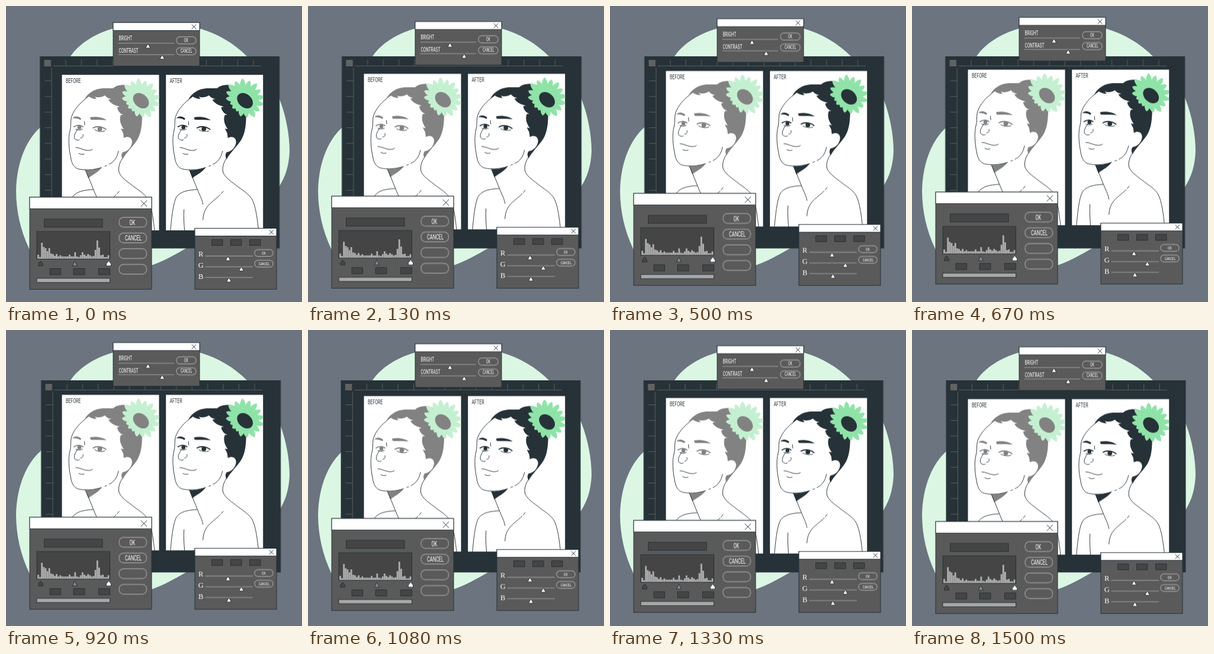
Write an HTML page that moves like this. It is 500 px wide and 500 px high and loops after 1.54 s.

```html
<!DOCTYPE html>
<html lang="en">
<head>
<meta charset="utf-8">
<title>Photo editing</title>
<style>
  html, body { margin: 0; width: 100%; height: 100%; overflow: hidden; background: #6b747f; }
  svg { display: block; width: 100vw; height: 100vh; }
  .float { animation: float 1540ms linear -50ms infinite; }
  .shake { animation: shake 1540ms linear -48ms infinite; }
  @keyframes float {
    0%, 100% { transform: translateY(.65px); }
    50% { transform: translateY(-9.35px); }
  }
  @keyframes shake {
    0%, 100% { transform: translateX(0); }
    10%, 90% { transform: translateX(-1px); }
    20%, 80% { transform: translateX(2px); }
    30%, 50%, 70% { transform: translateX(-4px); }
    40%, 60% { transform: translateX(4px); }
  }
  .body { fill: #5a5a5a; stroke: #263238; }
  .bar { fill: #fff; stroke: #263238; }
  .well { fill: #454545; stroke: #263238; }
  .strip { fill: #a9a9a9; stroke: #263238; }
  .cross { fill: none; stroke: #263238; }
  .btn { fill: none; stroke: #8a8a8a; stroke-width: 1.8; }
  .track { fill: none; stroke: #8a8a8a; stroke-width: 1.6; }
  .knob { fill: #fff; stroke: #263238; stroke-width: .9; }
  .ruler { fill: none; stroke: #626465; stroke-width: .9; }
  .line { fill: none; stroke: #263238; stroke-width: .95; stroke-linecap: round; stroke-linejoin: round; }
  .ink { fill: var(--ink); }
  .lid { fill: none; stroke: var(--ink); stroke-width: 1.8; stroke-linecap: round; }
  .leaf { fill: var(--leaf); }
  text { font-family: Roboto, "Liberation Sans", sans-serif; fill: #fff; }
  .rgb { font: 12.5px "Liberation Serif", serif; }
</style>
</head>
<body>
<svg viewBox="0 0 500 500" xmlns="http://www.w3.org/2000/svg">
  <defs>
    <path id="knob" class="knob" d="M0 0L4 7.3H-4Z"/>
    <clipPath id="sheet"><rect x="94.5" y="116.3" width="164" height="262.7"/></clipPath>
    <g id="portrait">
      <rect x="94.5" y="116.3" width="164" height="262.7" fill="#fff"/>
      <g clip-path="url(#sheet)">
        <path class="ink" d="M132 159C137 147 150 140 163 139L181 139C186 134 196 132 207 134L230 148L230 184C230 205 227 220 219 230C210 242 203 248 197 259C195 255 194 251 197 247C206 246 212 238 213 230C213 222 206 219 199 223L198 215L194 207L199 208C193 200 191 191 194 184L198 184C192 181 188 176 188 171L192 170C183 168 175 163 173 158L178 157C172 156 170 154 167 151C161 155 154 155 150 153L153 157C147 157 143 155 140 153Z"/>
        <path class="ink" d="M134 277C144 278 153 276 162 272C156 281 146 285 139 291Z"/>
        <path class="line" d="M133 158C121 167 112 180 110 190C109 198 110 204 108 211C105 222 106 240 109 254C111 268 116 275 126 276C138 278 151 276 161 273M167 270.5L170 269.5M174 267.5C182 264 188 256 190 245
          M196 258C192 265 189 273 191 281C195 291 206 297 217 306C228 314 238 320 242 331C247 344 249 362 251 380
          M134 277L140 291L151 318C154 324 156 329 157 335M147 310C131 311 119 313 112 323C106 335 104 360 102 380
          M125 344C124 356 125 368 126 380M191 313L188 317M186 319C173 332 158 337 157 361"/>
        <path class="line" d="M132.500 195L133 201M121 208C117 214 114 220 116 224C118 227 122 227 124 226M126 223C129 223 131 221 130 217
          M118 239C124 239 132 244 138 244C141 244 144 244 146 242M123 249C126 251 129 251 132 250
          M118 208C121 210 126 210 129 208M150 209C154 212 162 213 167 211"/>
        <path class="ink" d="M112 190C116 185 122 186 127 190L126 192.500C121 190 116 189 112 190ZM142 188C150 186.500 162 187 170 193C161 191.500 151 192.500 143 192Z"/>
        <path class="lid" d="M115 204C120 200.500 126 200.500 130 204M147 206C153 202.500 162 203 169 208.500"/>
        <ellipse class="ink" cx="124" cy="205" rx="3.3" ry="3.6"/>
        <ellipse class="ink" cx="158.500" cy="207.500" rx="4" ry="3.8"/>
        <g id="petals" class="leaf"></g>
        <ellipse class="leaf" cx="226" cy="158" rx="23" ry="19" transform="rotate(42 226 158)"/>
        <ellipse class="ink" cx="228" cy="160" rx="15" ry="11" transform="rotate(42 228 160)"/>
      </g>
    </g>
  </defs>

  <path fill="#dcf6e4" d="M109 85C124 63 150 47 181 38C230 25 285 26 327 38C358 47 385 63 407 85C438 105 454 135 463 160C473 186 479 218 479 245C478 270 472 288 462 304C430 350 365 383 303 410C284 421 266 431 246 438C170 462 70 470 39 410C25 380 17 347 17 312C18 262 36 224 58 205C85 175 84 122 109 85Z"/>

  <g class="shake">
    <rect x="57.5" y="85" width="405" height="324.5" fill="#263238"/>
    <rect x="64.8" y="91" width="11.5" height="11" fill="#626262"/>
    <path class="ruler" d="M80 101.3H431M77.3 104V378"/>
    <g id="ticks" class="ruler"></g>
  </g>

  <g class="float">
    <use href="#portrait" style="--ink:#828282;--leaf:#c4f0d1"/>
    <use href="#portrait" x="175.7" style="--ink:#263238;--leaf:#8fe3a8"/>

    <rect class="body" x="181" y="28" width="146" height="73.5"/>
    <rect class="bar" x="181" y="28" width="146" height="13.3"/>
    <path class="cross" d="M313.7 31.2l7.6 7.6m0-7.6l-7.6 7.6"/>
    <path class="track" d="M189.5 62.8H284M189.5 82.3H284"/>
    <use href="#knob" x="239.8" y="63.7"/>
    <use href="#knob" x="263.8" y="82.5"/>
    <rect class="btn" x="288" y="52" width="33" height="12" rx="5.5"/>
    <rect class="btn" x="288" y="70.5" width="33" height="12" rx="5.5"/>

    <rect class="body" x="40" y="323" width="206" height="155.5"/>
    <rect class="bar" x="40" y="323" width="206" height="19.5"/>
    <path class="cross" d="M227.7 328.5l10.3 10.3m0-10.3l-10.3 10.3"/>
    <rect class="well" x="64.5" y="360" width="98.5" height="13.5"/>
    <rect class="well" x="52" y="381" width="123.5" height="46.5"/>
    <g id="bars" fill="#afafaf"></g>
    <path fill="#454545" stroke="#263238" d="M58.5 430.5l4 5v3.5h-8v-3.5z"/>
    <path fill="#8a8a8a" stroke="#263238" d="M116.3 430.5l4 8.5h-8z"/>
    <path class="knob" d="M173.5 430.5l4 5v3.5h-8v-3.5z"/>
    <path class="well" d="M74 443.5h18.5v10.500H74zM114 443.5h19v10.500h-19zM156.5 443.5h19v10.500h-19z"/>
    <rect class="strip" x="52" y="460" width="123.5" height="7"/>
    <g id="buttons" class="btn"></g>

    <rect class="body" x="319" y="375.5" width="138" height="103"/>
    <rect class="bar" x="319" y="375.5" width="138" height="13"/>
    <path class="cross" d="M444.7 378.4l7.4 7.4m0-7.4l-7.4 7.4"/>
    <path class="well" d="M347.5 394.5h18.5v10h-18.5zM379.5 394.5h18.5v10h-18.5zM411.5 394.5h18.5v10h-18.5z"/>
    <path class="track" d="M336.5 422.4H417M336.5 440.5H417M336.5 458.5H417"/>
    <use href="#knob" x="375" y="422.7"/>
    <use href="#knob" x="397.5" y="440.3"/>
    <use href="#knob" x="376.5" y="458.8"/>
    <rect class="btn" x="420" y="411.5" width="31" height="11.5" rx="5.3"/>
    <rect class="btn" x="420" y="429.5" width="31" height="11.5" rx="5.3"/>
    <text class="rgb" x="325" y="422.7">R</text>
    <text class="rgb" x="324.7" y="442">G</text>
    <text class="rgb" x="325" y="461">B</text>
    <g id="labels"></g>
  </g>
</svg>
<script>
  const add = (id, tag, attrs, text = "") => {
    const el = document.createElementNS("http://www.w3.org/2000/svg", tag);
    for (const key in attrs) el.setAttribute(key, attrs[key]);
    el.textContent = text;
    document.getElementById(id).append(el);
  };

  const gap = 26.4;
  let marks = "";
  for (let i = 0; i < 13; i++) marks += `M${101.3 + i * gap} 90.5V101.3`;
  for (let i = 0; i < 8; i++) marks += `M65.5 ${126.4 + i * gap}H77.3`;
  add("ticks", "path", { d: marks });

  // Pointed petals, shorter towards the lower left
  const petals = 17;
  for (let i = 0; i < petals; i++) {
    const turn = i * 360 / petals + 14;
    const near = Math.max(0, Math.cos((turn - 140) * Math.PI / 180));
    const r = 35 - 12 * near * near - i % 2 * 2;
    add("petals", "path", {
      transform: `translate(225 158) rotate(${turn})`,
      d: `M6 0C${r * .5} -7 ${r * .85} -5.5 ${r} -1Q${r + 1} 0 ${r} 1C${r * .85} 5.5 ${r * .5} 7 6 0Z`
    });
  }

  const heights = [7, 3, 27, 20, 18, 13, 18, 9, 8, 5, 8, 4, 6, 4, 4, 4, 4, 7, 4, 4,
    11, 4, 3, 6, 11, 7, 5, 8, 6, 4, 5, 15, 31, 19, 6, 7, 3, 3, 6];
  heights.forEach((h, i) =>
    add("bars", "rect", { x: 53 + i * 3.12, y: 427 - h, width: 2.8, height: h }));

  for (let i = 0; i < 4; i++)
    add("buttons", "rect", { x: 191, y: 357 + i * 26.5, width: 46.5, height: 16.5, rx: 7.5 });

  // One condensed lettering style for all labels
  const label = (text, x, y, size, anchor = "middle", fill = "#fff") =>
    add("labels", "text", {
      transform: `translate(${x} ${y}) scale(.62 1)`,
      "font-size": size, "text-anchor": anchor, style: `fill:${fill}`
    }, text);

  label("BEFORE", 101, 130, 11.3, "start", "#263238");
  label("AFTER", 276.5, 130, 11.3, "start", "#263238");
  label("BRIGHT", 190.5, 58.5, 10.5, "start");
  label("CONTRAST", 190.5, 79.5, 10.5, "start");
  label("OK", 304.3, 61, 8.3);
  label("CANCEL", 304.7, 79.5, 8.3);
  label("OK", 213.3, 369.7, 12);
  label("CANCEL", 215, 396.2, 12);
  label("OK", 435.3, 420.2, 8);
  label("CANCEL", 436, 438.2, 8);
</script>
</body>
</html>
```
